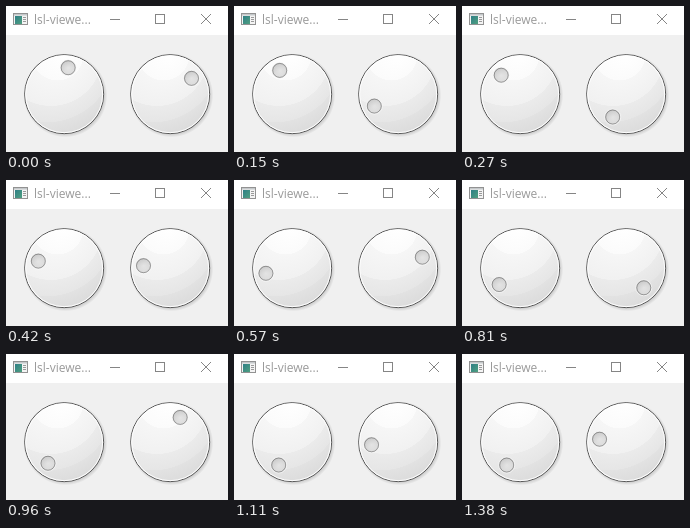
Recreate the animation shown at these times as an HTML page. Size 222x146 px, loop 1480 ms.

```html
<!DOCTYPE html>
<html lang="en">
<head>
<meta charset="utf-8">
<title>lsl-viewer</title>
<style>
  html, body { margin: 0; width: 100%; height: 100%; overflow: hidden; background: #f0f0f0; }
  svg { display: block; width: 222px; height: 146px; }
  text { font: 12px "Open Sans", "Noto Sans", sans-serif; fill: #999; }
</style>
</head>
<body>
<svg viewBox="0 0 222 146">
  <defs>
    <radialGradient id="shadow">
      <stop offset=".91" stop-opacity=".157"/>
      <stop offset="1" stop-opacity="0"/>
    </radialGradient>
    <radialGradient id="face" gradientUnits="userSpaceOnUse" cx="-26.3" cy="-40" r="102.7" fx="0" fy="-39.5">
      <stop offset="0" stop-color="#fff"/>
      <stop offset=".25" stop-color="#fbfbfb"/>
      <stop offset=".253" stop-color="#f6f6f6"/>
      <stop offset=".5" stop-color="#f1f1f1"/>
      <stop offset=".503" stop-color="#ebebeb"/>
      <stop offset=".66" stop-color="#e6e6e6"/>
      <stop offset=".663" stop-color="#e2e2e2"/>
      <stop offset="1" stop-color="#d4d4d4"/>
    </radialGradient>
    <radialGradient id="grip" gradientUnits="userSpaceOnUse" cx="7" cy="14" r="28" fx="0" fy="0">
      <stop offset="0" stop-color="#e3e3e3" stop-opacity=".8"/>
      <stop offset=".4" stop-color="#d0d0d0" stop-opacity=".8"/>
      <stop offset="1" stop-color="#b2b2b2" stop-opacity=".8"/>
    </radialGradient>
    <linearGradient id="pane" x2="1" y2="1">
      <stop offset="0" stop-color="#2f7f86"/>
      <stop offset="1" stop-color="#4f9f80"/>
    </linearGradient>
    <g id="dial">
      <circle cx="1.2" cy="1.2" r="41.95" fill="url(#shadow)"/>
      <circle r="39.5" fill="url(#face)" stroke="#565656"/>
      <circle r="38.5" fill="none" stroke="#fff"/>
    </g>
    <g id="knob" fill="url(#grip)">
      <circle r="8" stroke="#fff" stroke-opacity=".59"/>
      <circle r="7" stroke="#000" stroke-opacity=".314"/>
    </g>
  </defs>

  <rect width="222" height="146" fill="#f0f0f0"/>
  <rect width="222" height="29" fill="#fff"/>

  <g>
    <rect x="7.5" y="7.5" width="14" height="11" fill="#f4f4f4" stroke="#929292"/>
    <rect x="8" y="8" width="13" height="1.5" fill="#c4c8ca"/>
    <rect x="9" y="10" width="7" height="8" fill="url(#pane)"/>
    <path d="M17 11.5h3M17 13.5h3M17 15.5h3" stroke="#9a9a9a"/>
  </g>
  <text x="28" y="18">lsl-viewe...</text>
  <g fill="none" stroke="#858585">
    <path d="M104 13.5h10"/>
    <rect x="149.5" y="8.5" width="9" height="9"/>
    <path d="M195 8l10 10M205 8l-10 10"/>
  </g>

  <use href="#dial" x="58.17" y="88.17"/>
  <use href="#dial" x="164.17" y="88.17"/>
  <use href="#knob" id="left"/>
  <use href="#knob" id="right"/>
</svg>
<script>
  const LOOP = 1480, REACH = 26.6;
  // start time in ms, left angle, right angle (degrees, counter-clockwise from east)
  const steps = [
    [0, 81, 36],
    [150, 117.5, 207],
    [270, 135, 240],
    [420, 165, 175],
    [570, 191.5, 24],
    [690, 206, -56],
    [810, 218.5, -48],
    [960, 233, 67.5],
    [1110, 240, 186],
    [1260, 240, 240],
    [1380, 240, 174]
  ];
  const left = document.getElementById("left");
  const right = document.getElementById("right");

  function turn(knob, cx, degrees) {
    const a = degrees * Math.PI / 180;
    const x = cx + REACH * Math.cos(a), y = 88 - REACH * Math.sin(a);
    knob.setAttribute("transform", `translate(${x.toFixed(2)} ${y.toFixed(2)})`);
  }

  let start, shown;
  function draw(now) {
    start ??= now;
    const t = Math.max(0, now - start) % LOOP;
    const step = steps.findLast(s => s[0] <= t);
    if (step !== shown) {
      shown = step;
      turn(left, 58, step[1]);
      turn(right, 164, step[2]);
    }
    requestAnimationFrame(draw);
  }
  draw(performance.now());
</script>
</body>
</html>
```
